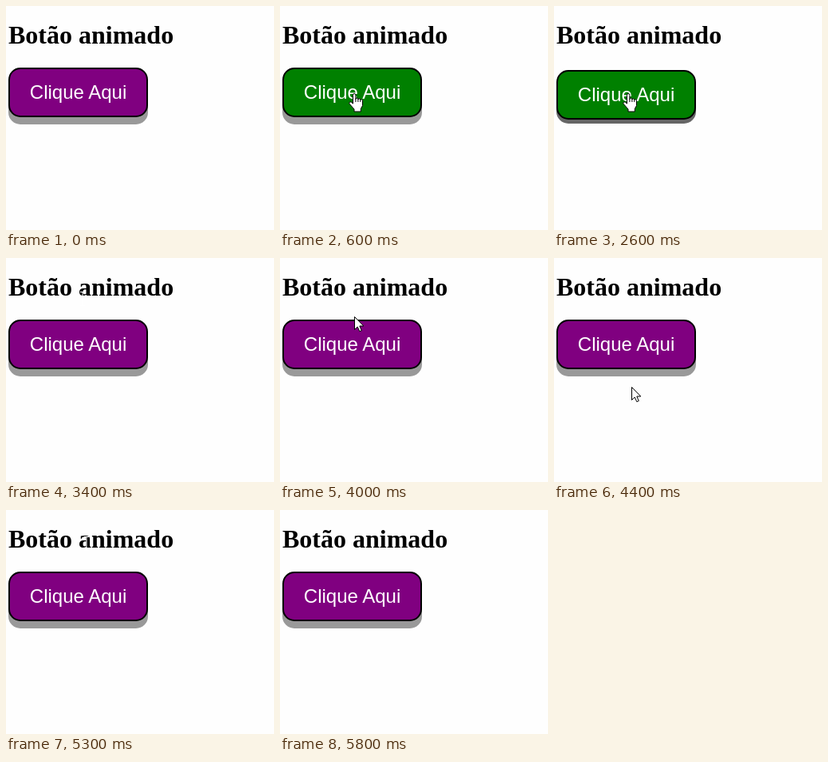
An HTML page that plays this animation: 336 px wide and 280 px high, repeating every 6.1 s.

```html
<!DOCTYPE html>
<html lang="pt">
<head>
<meta charset="utf-8">
<title>Botão animado</title>
<style>
  html, body { margin: 0; width: 100%; height: 100%; overflow: hidden; background: #fefefe; }
  svg { display: block; width: 336px; height: 280px; cursor: default; }
  .title { font: bold 32px "Liberation Serif", "Times New Roman", serif; }
  .label { font: 24px "Liberation Sans", Arial, sans-serif; fill: #fff; }
  .cursor path { fill: #fff; stroke: #000; stroke-linejoin: round; }
  .cursor #beam { fill: none; stroke: #fff; }
</style>
</head>
<body>
<svg viewBox="0 0 336 280">
  <text class="title" x="3" y="47">Botão animado</text>
  <rect id="shadow" x="3" width="175" height="62" rx="15"/>
  <g id="button">
    <rect id="face" x="4" y="78" width="173" height="60" rx="14" stroke="#000" stroke-width="2"/>
    <text class="label" x="29.8" y="116">Clique Aqui</text>
  </g>
  <g class="cursor" id="cursor">
    <path id="arrow" d="M.5 .5V16.5L4.2 13L6.8 18.7L9.3 17.6L6.8 12H11.8Z"/>
    <path id="beam" d="M0 -8.5H6M3 -8.5V8.5M0 8.5H6"/>
    <g id="hand" transform="translate(-7 0)">
      <path d="M5.5 13V2.3a1.7 1.7 0 0 1 3.4 0V7.4a1.5 1.5 0 0 1 3 .6a1.5 1.5 0 0 1 2.9 .8a1.4 1.4 0 0 1 2.7 1V15.5L15.3 19.5V23H7V20L1 13.2C.2 11.6 1.9 10.3 3.3 11.2Z"/>
      <path d="M8.9 7V11M11.9 8V11M14.8 9V11"/>
    </g>
  </g>
</svg>
<script>
const LOOP = 6100, STEP = 100;
const ENTER = 100, LEAVE = 5800;
const TOP = 1, TITLE = 42, ABOVE = 73, REST = 109, LOW = 121, BELOW = 177;
const $ = id => document.getElementById(id);

// Vertical pointer moves: start, duration, destination.
const moves = [
  [100, 300, LOW], [400, 200, REST],
  [2700, 400, TITLE], [3300, 100, TITLE + 9], [3400, 400, REST - 3],
  [3900, 100, ABOVE], [4000, 300, BELOW], [4300, 300, REST + 3],
  [5000, 300, TITLE], [5300, 300, LOW], [5600, 100, TOP]
];
const presses = [[1900, 2000], [2600, 2700], [4800, 5000]];

const between = (v, a, b) => v >= a && v < b;
const ease = (t, start, duration) => {
  const u = Math.max(0, Math.min(1, (t - start) / duration));
  return (1 - Math.cos(Math.PI * u)) / 2;
};
const pointerX = t => Math.round(93 + 5 * ease(t, 4000, 600));
const pointerY = t => Math.round(moves.reduce(
  (y, [start, duration, to]) => y + (to - y) * ease(t, start, duration), TOP));

function show(id, on) {
  $(id).setAttribute("display", on ? "inline" : "none");
}

function draw(t) {
  const present = between(t, ENTER, LEAVE);
  const x = pointerX(t), y = pointerY(t);
  const hover = present && between(y, 77, 139);
  const beam = between(y, 18, 57);
  const down = presses.some(([a, b]) => between(t, a, b));

  $("face").setAttribute("fill", hover ? "#008000" : "#800080");
  $("button").setAttribute("transform", `translate(0 ${down ? 3 : 0})`);
  $("shadow").setAttribute("y", down ? 85 : 86);
  $("shadow").setAttribute("fill", down ? "#666" : "#999");

  show("cursor", present);
  $("cursor").setAttribute("transform", `translate(${x} ${y})`);
  show("hand", hover);
  show("beam", beam);
  show("arrow", !hover && !beam);
}

const origin = performance.now();
function tick() {
  const t = (performance.now() - origin) % LOOP;
  draw(Math.floor(t / STEP) * STEP);
  requestAnimationFrame(tick);
}
tick();
</script>
</body>
</html>
```
